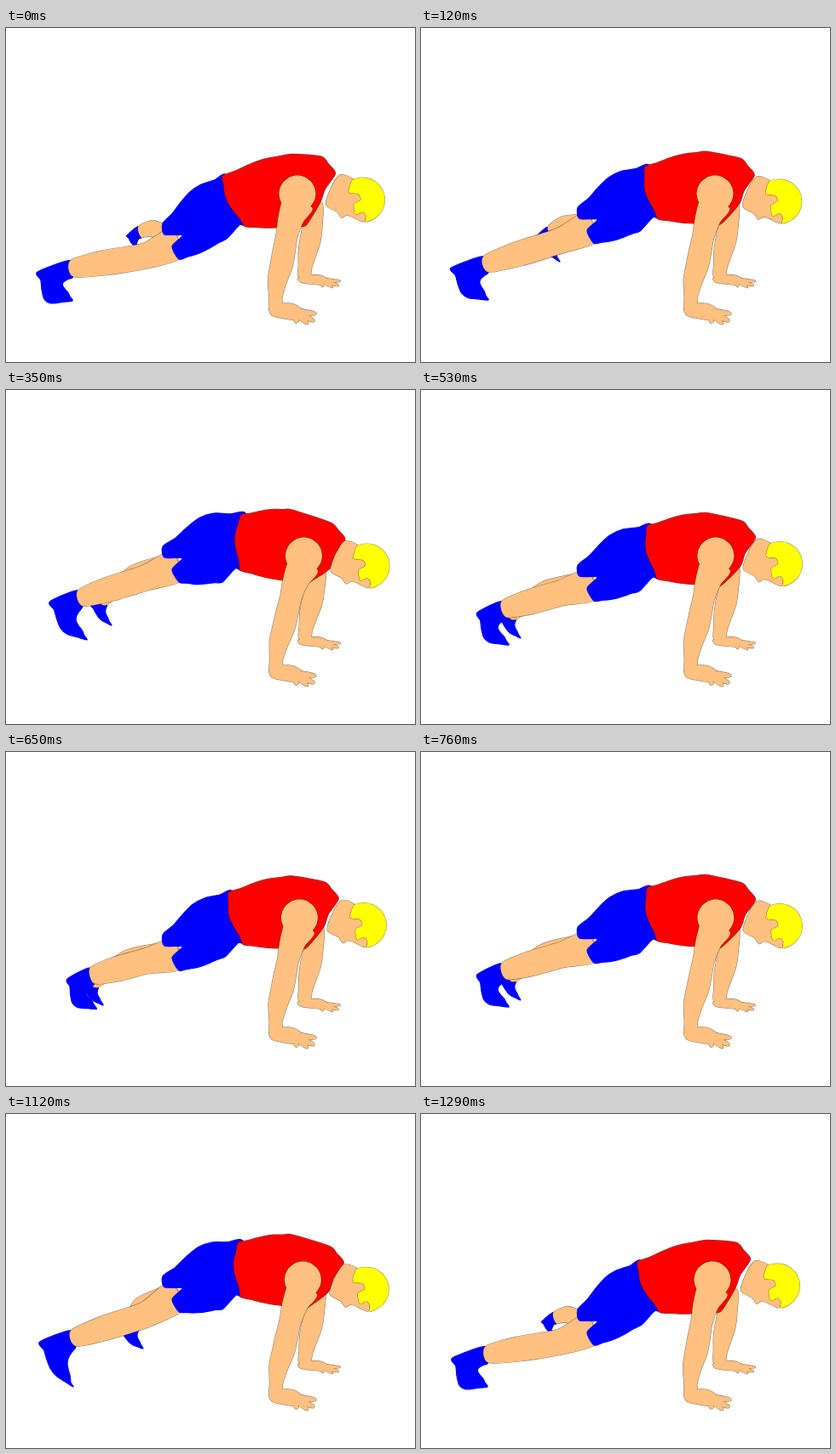
These frames come from a looping animation (480x393 px, 1.34 s). An HTML page with a canvas:

```html
<!DOCTYPE html>
<html lang="en">
<head>
<meta charset="utf-8">
<title>Plank jump</title>
<style>
html, body { margin: 0; width: 100%; height: 100%; overflow: hidden; background: #fff; }
canvas { display: block; }
</style>
</head>
<body>
<canvas id="stage" width="480" height="393"></canvas>
<script>
const ctx = document.getElementById('stage').getContext('2d');
const LOOP = 1340, LAST = 22, TURN = 11;
const SKIN = '#ffc080', RED = '#ff0000', BLUE = '#0000ff', YELLOW = '#ffff00';
const SKIN_LINE = 'rgba(70,40,10,.6)';

const lerp = (a, b, t) => a + (b - a) * t;
const mix = (a, b, t) => a.map((v, i) => lerp(v, b[i], t));
const add = (p, x, y) => [p[0] + x, p[1] + y];

// Hip drop, knee height and sole curve, then joints of the near and the far leg.
const pose = (drop, knee, sole, ...joints) => [drop, knee, sole, ...joints.flat()];
//                 drop knee sole  ankle      toe        far knee    far ankle   far toe
const start  = pose(27, 268, .38, [77, 283], [78, 321], [172, 236], [157, 240], [156, 259]);
const push   = pose(16, 250, .26, [76, 278], [79, 320], [168, 231], [152, 240], [163, 275]);
const lift   = pose(4,  236, .14, [79, 264], [79, 321], [157, 226], [149, 252], [161, 276]);
const flight = pose(0,  221, .21, [87, 245], [95, 294], [150, 216], [114, 248], [124, 277]);
const land   = pose(13, 239, .29, [97, 258], [103, 300], [145, 235], [107, 265], [117, 292]);
const settle = mix(flight, land, 1.4);
const keys = [[0, start], [2, push], [3, lift], [6, flight], [9, land], [TURN, settle]];

function poseAt(step) {
  let i = 0;
  while (i < keys.length - 2 && step >= keys[i + 1][0]) i++;
  const [from, a] = keys[i], [to, b] = keys[i + 1];
  return mix(a, b, (step - from) / (to - from));
}

// Points between a and b, arched to the left of the direction of travel.
function bow(a, b, height) {
  const [dx, dy] = [b[0] - a[0], b[1] - a[1]], pts = [];
  for (let s = 1 / 6; s < 0.9; s += 1 / 6) {
    const h = height * Math.sin(Math.PI * s ** 1.2) ** 1.4;
    pts.push([a[0] + dx * s + dy * h, a[1] + dy * s - dx * h]);
  }
  return pts;
}

// Outline around a chain of [x, y, radius] joints, with flat ends.
function limb(joints) {
  const side = sign => joints.map(([x, y, r], i) => {
    const p = joints[Math.max(0, i - 1)], q = joints[Math.min(joints.length - 1, i + 1)];
    const [dx, dy] = [q[0] - p[0], q[1] - p[1]], k = sign * r / Math.hypot(dx, dy);
    return [x + dy * k, y - dx * k];
  });
  return [...side(1), ...side(-1).reverse()];
}

function ring(x, y, r, from = 0, to = 360) {
  const pts = [];
  for (let a = from; a < to; a += 20) {
    const rad = a * Math.PI / 180;
    pts.push([x + r * Math.cos(rad), y + r * Math.sin(rad)]);
  }
  return pts;
}

function smoothPath(pts) {
  const n = pts.length, at = i => pts[(i + n) % n], path = new Path2D();
  path.moveTo(...pts[0]);
  for (let i = 0; i < n; i++) {
    const [p, a, b, q] = [at(i - 1), at(i), at(i + 1), at(i + 2)];
    path.bezierCurveTo(
      a[0] + (b[0] - p[0]) / 8, a[1] + (b[1] - p[1]) / 8,
      b[0] - (q[0] - a[0]) / 8, b[1] - (q[1] - a[1]) / 8, b[0], b[1]);
  }
  path.closePath();
  return path;
}

// Overlapping outlines become one shape: all edges first, then all fills.
function paint(outlines, fill, line) {
  const paths = outlines.map(smoothPath);
  ctx.fillStyle = fill;
  ctx.strokeStyle = line;
  paths.forEach(p => ctx.stroke(p));
  paths.forEach(p => ctx.fill(p));
}

function hand(x, y, sx, sy) {
  const put = ([px, py, ...r]) => [x + px * sx, y + py * sy, ...r.map(v => v * sy)];
  const palm = [[7, -4], [21, -3], [30, 4], [23, 15], [5, 13], [-5, 10], [-8, 2]].map(put);
  const tips = [[45, 8], [43, 16], [36, 19], [24, 18]];
  return [palm, ...tips.map(tip => limb([put([22, 6, 4]), put([...tip, 2])]))];
}

// Hands stay planted while the top of the arm follows the shoulder.
const lean = (joints, dx, ground) => joints.map(([x, y, r]) =>
  [x + dx * Math.min(1, Math.max(0, (ground - y) / (ground - 190))), y, r]);

function drawLeg(joints, heelBack, toe, sole) {
  const outline = limb(joints), n = joints.length;
  const under = outline[n - 1], over = outline[n];
  const heel = add(joints[n - 1], -heelBack, 4);
  paint([[over, heel, ...bow(heel, toe, -sole), toe, add(toe, -3, -5),
    ...bow(add(toe, -3, -5), under, sole * 1.2), under]], BLUE, BLUE);
  paint([outline], SKIN, SKIN_LINE);
}

function drawArms(dx) {
  const far = [[364, 206, 11], [362, 235, 11.5], [359, 250, 12], [355, 265, 10.5],
    [352, 280, 8], [350, 293, 6.5]];
  const near = [[351, 204, 17], [340, 224, 15], [334, 245, 12.5], [330, 262, 13],
    [326, 279, 13], [320, 298, 11], [317, 318, 7.5], [317, 331, 7.5]];
  return {
    far: [limb(lean(far, dx * 0.6, 300)), ...hand(350, 293, 0.9, 0.6)],
    near: [limb(lean(near, dx, 330)), ring(349.5 + dx, 195, 21.5), ...hand(317, 328, 1, 1)]
  };
}

function drawHead(dx, dy) {
  const place = pts => pts.map(p => add(p, dx, dy));
  const face = [[397, 178], [412, 182], [428, 200], [427, 231], [420, 231], [412, 227],
    [405, 225], [399, 228], [394, 221], [381, 213], [386, 195]];
  const hairline = [[428, 226], [424, 221], [416, 224], [414, 212], [422, 207],
    [419, 200], [408, 198]];
  paint([place(face)], SKIN, SKIN_LINE);
  paint([place([...ring(424, 207, 26, -118, 85), ...hairline])], YELLOW, 'rgba(90,80,0,.6)');
}

function draw(step) {
  const [drop, kneeY, sole, ax, ay, tx, ty, fkx, fky, fax, fay, ftx, fty] = poseAt(step);

  // The whole upper body follows the drop of the hips.
  const dx = -0.28 * drop;
  const hem = [184, 184 + 1.7 * drop];
  const waist = [276 - 0.81 * drop, 147 + drop];
  const belly = [275 + 0.2 * drop, 212 + 0.8 * drop];
  const crest = [336, 141 + 0.27 * drop];
  const nape = [398 + 1.5 * dx, 176 - 0.18 * drop];
  const armpit = [352, 228 + 0.15 * drop];

  ctx.fillStyle = '#fff';
  ctx.fillRect(0, 0, 480, 393);
  ctx.lineWidth = 1.2;
  ctx.lineJoin = 'round';

  const arms = drawArms(dx);
  paint(arms.far, SKIN, SKIN_LINE);

  drawLeg([[...add(hem, 14, 18), 9], [fkx, fky, 9.5], [fax, fay, 6.5]], 15, [ftx, fty], 0.12);
  const knee = [164, kneeY], ankle = [ax, ay];
  drawLeg([[...add(hem, 16, 23), 18], [...knee, 15], [...mix(ankle, knee, 0.44), 14.5],
    [...ankle, 9.5]], 40 - 0.45 * (ax - 77), [tx, ty], sole);

  const back = add(waist, 6, 0), front = add(belly, 3, -3);
  const crotch = add(front, -24, 17), cuff = add(hem, 19, 42);
  paint([[hem, ...bow(hem, back, 0.16 - 0.0015 * drop), back, front, add(front, -9, 1), crotch,
    ...bow(crotch, cuff, 0.05), cuff, add(hem, 11, 27), add(hem, 23, 14), add(hem, 2, 13)]],
    BLUE, BLUE);

  paint([[waist, ...bow(waist, crest, 0.05), crest, add(nape, -17, -20), add(nape, -8, -11), nape,
    add(nape, -12, 18), add(nape, -18, 34), armpit, ...bow(armpit, belly, 0.03), belly,
    ...bow(belly, waist, 0.11)]], RED, 'rgba(50,0,0,.7)');

  drawHead(0.73 * dx, -0.18 * drop);
  paint(arms.near, SKIN, SKIN_LINE);
}

// 17 steps per second on a 10 ms clock; the second half runs back.
const stepStart = k => Math.round(k * 100 / 17) * 10;

function tick() {
  const t = performance.now() % LOOP;
  let k = LAST;
  while (k > 0 && stepStart(k) > t) k--;
  draw(TURN - Math.abs(TURN - k));
  requestAnimationFrame(tick);
}
tick();
</script>
</body>
</html>
```
